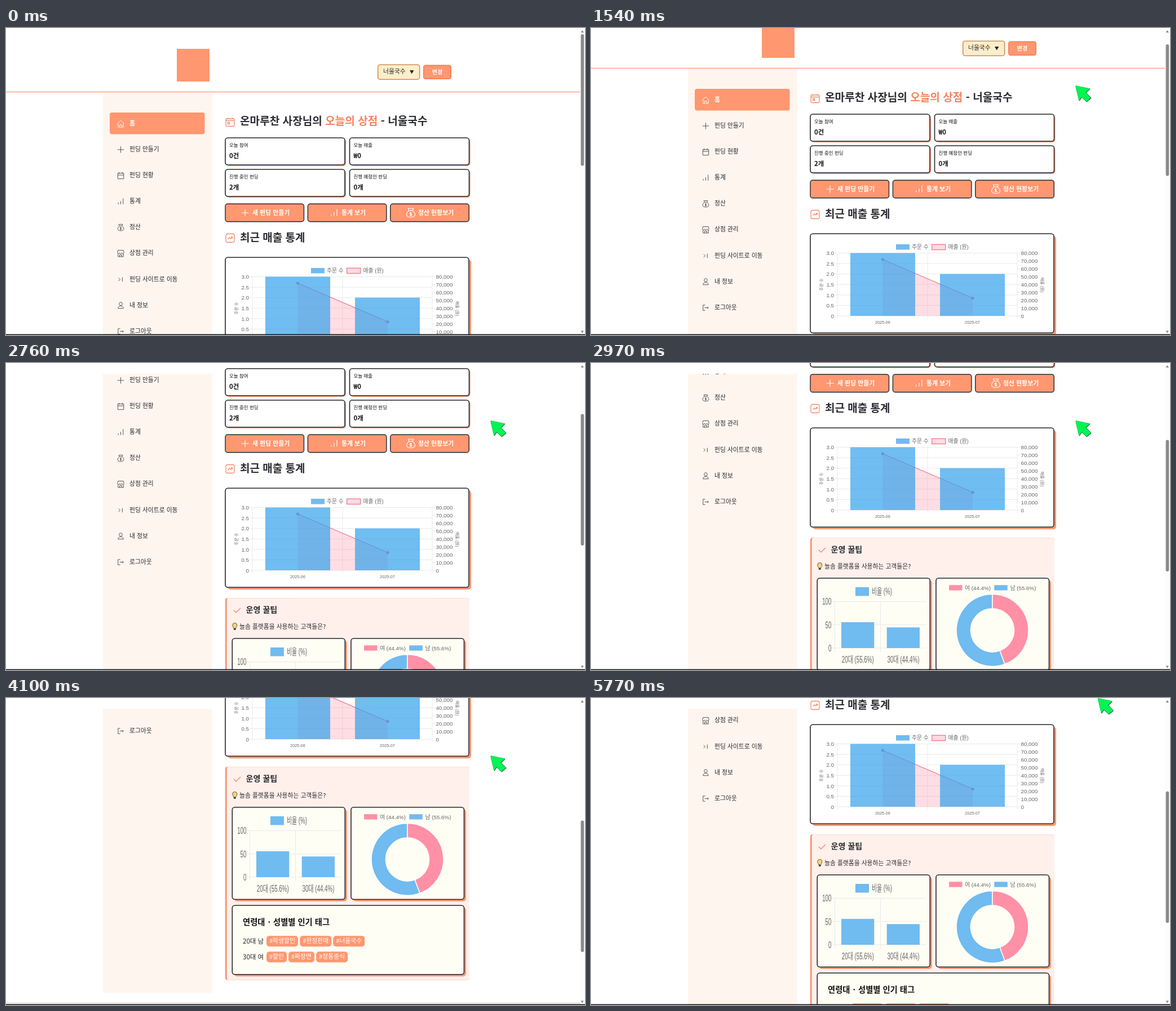
Recreate the animation shown at these times as an HTML page. Size 1027 px wide and 545 px high, loop 5.79 s.

```html
<!DOCTYPE html>
<html lang="ko">
<head>
<meta charset="utf-8">
<title>Shop dashboard</title>
<style>
html, body { margin: 0; width: 100%; height: 100%; overflow: hidden; background: #fff; }
svg { display: block; }
text { font-family: 'Noto Sans CJK KR', 'Noto Sans KR', sans-serif; white-space: pre; }
.chart text { font-family: 'Liberation Sans', 'Noto Sans CJK KR', sans-serif; }
</style>
</head>
<body>
<svg id="stage" width="1027" height="545" viewBox="0 0 1027 545"></svg>
<script>
const ORANGE = '#ff9770', INK = '#25262b', BLUE = '#70bbef', PINK = '#ff90a6', GREY = '#666', GRID = '#e9e9e9';

const rect = (x, y, w, h, fill, more = '') =>
  `<rect x="${x}" y="${y}" width="${w}" height="${h}" fill="${fill}" ${more}/>`;
const path = (d, stroke, width = 1, fill = 'none', more = '') =>
  `<path d="${d}" stroke="${stroke}" stroke-width="${width}" fill="${fill}" ${more}/>`;
// y is the vertical centre of the glyphs
const text = (str, x, y, size, fill = INK, more = '') =>
  `<text x="${x}" y="${y + size * 0.37}" font-size="${size}" fill="${fill}" ${more}>${str}</text>`;
const bold = (str, x, y, size, fill, more = '') =>
  text(str, x, y, size, fill, 'font-weight="700" ' + more);
const card = (x, y, w, h, drop, fill = '#fff') =>
  rect(x + drop, y + drop, w, h, ORANGE, 'rx="5"') +
  rect(x, y, w, h, fill, `rx="4.5" stroke="${INK}" stroke-width="1.6"`);

const icons = {
  home: 'M-6 0L0-6 6 0M-5-1V6.5H5V-1M-2 6.5V2H2V6.5',
  plus: 'M-6 0H6M0-6V6',
  calendar: 'M-5.5-4.5h11v10.5h-11zM-5.5-1h11M-3-6.5v3M3-6.5v3',
  bars: 'M-4.5 5V2M0 5V-1M4.5 5V-6',
  bag: 'M-2.5-3C-8 2-6 6 0 6S8 2 2.5-3ZM-2.5-3L-3.5-6H3.5L2.5-3M1.5 .3C0-.7-2 0-1 1.3S2 2 1 3.3-1.5 3.2-1.5 3.2M0-1V4.5',
  shop: 'M-5 0V6H5V0M-6-2L-5-6H5L6-2C6 1 2 1 2-1.5C2 1-2 1-2-1.5C-2 1-6 1-6-2ZM-2 6V2.5H2V6',
  move: 'M-4-3L-1 0-4 3M3-4V4',
  person: 'M0-6a3 3 0 1 0 0 6a3 3 0 1 0 0-6M-5 5.5C-5-.5 5-.5 5 5.5Z',
  logout: 'M-1-5H-5V5H-1M-2 0H5M3-2L5 0 3 2',
  today: 'M-6-6H6Q7.5-6 7.5-4.5V6Q7.5 7.5 6 7.5H-6Q-7.5 7.5-7.5 6V-4.5Q-7.5-6-6-6ZM-7.5-2.5H7.5M-4-7.5V-5M4-7.5V-5M-4 .5H-1V3.5H-4Z',
  trend: 'M-4.5-7.5H4.5Q7.5-7.5 7.5-4.5V4.5Q7.5 7.5 4.5 7.5H-4.5Q-7.5 7.5-7.5 4.5V-4.5Q-7.5-7.5-4.5-7.5ZM-4 2L-1-1 1 1 4-2M1.5-2H4V.5',
  check: 'M-6 0L-2 4 6-4'
};
const icon = (name, x, y, stroke, scale = 1, width = 1) =>
  `<g transform="translate(${x} ${y}) scale(${scale})">${path(icons[name], stroke, width / scale)}</g>`;

function header() {
  return rect(303, 37, 58, 58, ORANGE) +
    rect(659.7, 65.2, 74, 26, '#fdeecb', 'rx="4" stroke="#cf8f55" stroke-width="1.6"') +
    text('너울국수', 669, 77.5, 10.8) +
    path('M716 75H723.5L719.7 81.5Z', 'none', 0, INK) +
    rect(740.7, 66.2, 48.6, 24, ORANGE, 'rx="3.5" stroke="#f47a4c" stroke-width="1.4"') +
    bold('변경', 765, 78, 10, '#fff', 'text-anchor="middle"') +
    rect(0, 112.8, 1018, 1.4, '#ff9e7e');
}

function sidebar() {
  const items = [['home', '홈'], ['plus', '펀딩 만들기'], ['calendar', '펀딩 현황'], ['bars', '통계'], ['bag', '정산'],
    ['shop', '상점 관리'], ['move', '펀딩 사이트로 이동'], ['person', '내 정보'], ['logout', '로그아웃']];
  return rect(172, 113.5, 193.5, 890, '#fff5ef') +
    rect(184, 150, 168.5, 38.5, ORANGE, 'rx="4"') +
    items.map(([name, label], i) => {
      const y = 169 + i * 46.1;
      return icon(name, 203.5, y + 0.8, i ? '#444' : '#fff', 0.95, 0.9) +
        (i ? text(label, 219, y, 10.8) : bold(label, 219, y, 10.8, '#fff'));
    }).join('');
}

function summary() {
  const stats = [['오늘 참여', '0건'], ['오늘 매출', '₩0'], ['진행 중인 펀딩', '2개'], ['진행 예정인 펀딩', '0개']];
  const buttons = [['plus', '새 펀딩 만들기', 424, 437, 1.1], ['bars', '통계 보기', 582, 595, 1.1], ['bag', '정산 현황보기', 718, 731, 1.3]];
  return icon('today', 397.5, 167, '#f28b6c', 1, 1.3) +
    bold(`온마루찬 사장님의 <tspan fill="#f5835f">오늘의 상점</tspan> - 너울국수`, 415, 165, 19.1, '#2c2d33') +
    stats.map(([label, value], i) => {
      const x = 389 + i % 2 * 220.5, y = 195 + (i >> 1) * 56;
      return card(x, y, 212, 48, 2) + text(label, x + 7, y + 13, 8.5, '#111') + bold(value, x + 7, y + 31.5, 11.4, '#111');
    }).join('') +
    buttons.map(([name, label, ix, tx, scale], i) =>
      rect(389 + i * 146.4, 312.2, 139.5, 31.5, ORANGE, `rx="4" stroke="${INK}" stroke-width="1.4"`) +
      icon(name, ix, 328, '#fff', scale, 1.1) + bold(label, tx, 328, 10.9, '#fff')).join('');
}

function salesChart() {
  let out = '';
  for (let i = 0; i <= 6; i++) {
    const y = 441.5 + i * 18.6;
    out += path(`M432 ${y}H756`, GRID) +
      text(i < 6 ? (3 - i / 2).toFixed(1) : '0', 431, y, 9.8, GREY, 'text-anchor="end"');
  }
  for (let i = 0; i <= 8; i++) {
    const y = 441.5 + i * 13.95;
    out += path(`M756 ${y}h5`, GRID) +
      text(((8 - i) * 10000).toLocaleString('en-US'), 762.5, y, 9.8, GREY);
  }
  for (const x of [437, 597, 756]) out += path(`M${x} 441.5V558`, GRID);
  out += path('M517.5 453L677 521.5V553H517.5Z', 'none', 0, 'rgba(255,99,132,.22)') +
    path('M517.5 453L677 521.5', '#ee7288', 1.3) +
    [[517.5, 453], [677, 521.5]].map(([x, y]) => `<circle cx="${x}" cy="${y}" r="2.6" fill="#e86a88"/>`).join('') +
    rect(460, 441.5, 115, 111.5, 'rgba(54,162,235,.71)') +
    rect(619, 478.6, 115, 74.4, 'rgba(54,162,235,.71)');
  out += rect(541, 426, 24, 9.5, BLUE) + text('주문 수', 569, 430.5, 9.8, GREY) +
    rect(604.7, 426.3, 24, 9.3, '#ffdbe1', 'stroke="#ef7d92" stroke-width="1.4"') + text('매출 (원)', 633.5, 430.5, 9.8, GREY) +
    text('2025-06', 517.3, 564, 7.3, GREY, 'text-anchor="middle"') +
    text('2025-07', 676.5, 564, 7.3, GREY, 'text-anchor="middle"') +
    `<g transform="translate(408 497.5) rotate(-90)">${text('주문 수', 0, 0, 7.2, GREY, 'text-anchor="middle"')}</g>` +
    `<g transform="translate(801 498) rotate(90)">${text('매출 (원)', 0, 0, 7.2, GREY, 'text-anchor="middle"')}</g>`;
  return icon('trend', 397.5, 373, '#f28b6c', 1, 1.3) + bold('최근 매출 통계', 415, 371.7, 19, '#2c2d33') +
    card(389, 407.3, 432, 176, 4) + `<g class="chart">${out}</g>`;
}

function ageChart() {
  // this chart's labels are drawn 1.6 times taller than wide
  const tall = (str, x, y, anchor) =>
    `<g transform="translate(${x} ${y}) scale(1 1.6)">${text(str, 0, 0, 9.8, GREY, `text-anchor="${anchor}"`)}</g>`;
  let out = rect(469, 690, 24, 15.5, BLUE) + tall('비율 (%)', 498, 697.5, 'start');
  [100, 50, 0].forEach((n, i) => {
    const y = 715.5 + i * 41.25;
    out += path(`M427 ${y}H594.5`, GRID) + tall(n, 426.5, y, 'end');
  });
  for (const x of [432.5, 513.5]) out += path(`M${x} 715.5V805`, GRID);
  [55.6, 44.4].forEach((n, i) => {
    const x = 444 + i * 80.7, h = n * 0.825;
    out += rect(x, 798 - h, 58.3, h, BLUE) + tall(`${20 + i * 10}대 (${n}%)`, x + 29.3, 818, 'middle');
  });
  return out;
}

function genderChart() {
  const cx = 712, cy = 766.5, R = 64, r = 38.5, a = 0.444 * 2 * Math.PI;
  const at = (rad, ang) => `${cx + rad * Math.sin(ang)} ${cy - rad * Math.cos(ang)}`;
  const slice = (from, to, fill, big) => path(
    `M${at(R, from)}A${R} ${R} 0 ${big} 1 ${at(R, to)}L${at(r, to)}A${r} ${r} 0 ${big} 0 ${at(r, from)}Z`, '#fff', 1.5, fill);
  return rect(635, 686.3, 23.5, 9.3, PINK) + text('여 (44.4%)', 663, 691, 9.8, GREY) +
    rect(715.3, 686.3, 23.5, 9.3, BLUE) + text('남 (55.6%)', 743.5, 691, 9.8, GREY) +
    slice(a, 2 * Math.PI, BLUE, 1) + slice(0, a, PINK, 0);
}

function tips() {
  const cream = '#fffef5';
  const rows = [
    ['20대 남', [['학생할인', 462, 56], ['한정판매', 521.3, 56], ['너울국수', 580.3, 56]]],
    ['30대 여', [['할인', 462, 36], ['짜장면', 501, 46], ['정통중식', 550.2, 56]]]
  ];
  return rect(389, 602.3, 433, 378.2, '#f58a6b', 'rx="4"') +
    path('M395 602.3H818Q822 602.3 822 606.3V976.5Q822 980.5 818 980.5H395Q391.5 980.5 391.5 976V607Q391.5 602.3 395 602.3Z', 'none', 0, '#fff0eb') +
    icon('check', 410, 624, '#f58a6b', 1, 1.4) + bold('운영 꿀팁', 425.5, 622.3, 14.1, '#2c2d33') +
    path('M403.8 656C403.8 654 401.8 653.5 401.8 650.5a4 4 0 0 1 8 0C409.8 653.5 407.8 654 407.8 656Z', '#5b4a2c', 0.9, '#ffd27a') +
    rect(403.8, 656, 4, 3, '#444', 'rx="1"') +
    text('늘솜 플랫폼을 사용하는 고객들은?', 414, 653, 10.8) +
    card(401.3, 674, 200, 163.5, 3.5, cream) + card(612, 674, 200.5, 163.5, 3.5, cream) +
    `<g class="chart">${ageChart()}${genderChart()}</g>` +
    card(401.3, 848.3, 411.2, 122.5, 3.5, cream) +
    bold('연령대<tspan x="464.5">·</tspan><tspan x="474">성별별 인기 태그</tspan>', 420, 877.5, 14.3, '#111') +
    rows.map(([who, tags], i) => {
      const y = 911.7 + i * 28;
      return text(who, 420, y + 0.5, 11.5, INK, 'font-weight="500"') + tags.map(([tag, x, w]) =>
        rect(x, y - 9.5, w, 19, ORANGE, 'rx="5"') + text('#' + tag, x + w / 2, y - 0.7, 10.8, '#fff', 'text-anchor="middle"')).join('');
    }).join('');
}

const arrow = 'M860.3 103.3L883.5 108 876.7 114.5 885.7 124 879 129.7 870 121.2 866 127.5Z';
document.getElementById('stage').innerHTML = `
  <clipPath id="below"><rect y="19" width="1027" height="526"/></clipPath>
  <g clip-path="url(#below)"><g class="page">${sidebar()}</g></g>
  <g class="page">${header()}${summary()}${salesChart()}${tips()}${rect(0, 1020, 1018, 40, '#eeeae6')}</g>
  ${rect(1018, 0, 9, 545, '#fcfcfc')}
  ${path('M1019.5 8H1025L1022.2 4ZM1019.5 537.5H1025L1022.2 541.5Z', 'none', 0, '#888')}
  <g id="thumb">${rect(1019.6, 11, 5.6, 233.5, '#8a8a8a', 'rx="2.8"')}</g>
  ${rect(0, 543.5, 1027, 1.5, '#1c1c1c')}
  <g id="cursor" stroke-linejoin="round">
    ${path(arrow, '#24504a', 2.4, '#24504a', 'transform="translate(.4 .4)"')}
    ${path(arrow, '#00f552', 1.4, '#00f552')}
  </g>`;

const pages = document.querySelectorAll('.page');
const thumb = document.getElementById('thumb'), cursor = document.getElementById('cursor');
const LOOP = 5790;
// wheel turns: start, duration, distance
const turns = [[1410, 205, 60], [2120, 302, 120], [2725, 292, 120], [3350, 180, 60], [3790, 310, 120], [5230, 310, -120]];
const clamp = v => Math.min(1, Math.max(0, v));
const ease = v => v * v * (3 - 2 * v);
const move = (el, x, y) => el.setAttribute('transform', `translate(${x} ${y})`);

function draw(now) {
  const t = now % LOOP;
  const scroll = Math.round(turns.reduce((sum, [start, span, dist]) => sum + dist * ease(clamp((t - start) / span)), 0));
  pages.forEach(p => move(p, 0, -scroll));
  move(thumb, 0, scroll * 0.43);
  const away = clamp((t - 5600) / 170) ** 2;
  move(cursor, 39.5 * away, -102 * away);
  cursor.setAttribute('visibility', t < 1000 ? 'hidden' : 'visible');
}

const begin = performance.now();
function tick() {
  draw(performance.now() - begin);
  requestAnimationFrame(tick);
}
tick();
</script>
</body>
</html>
```
